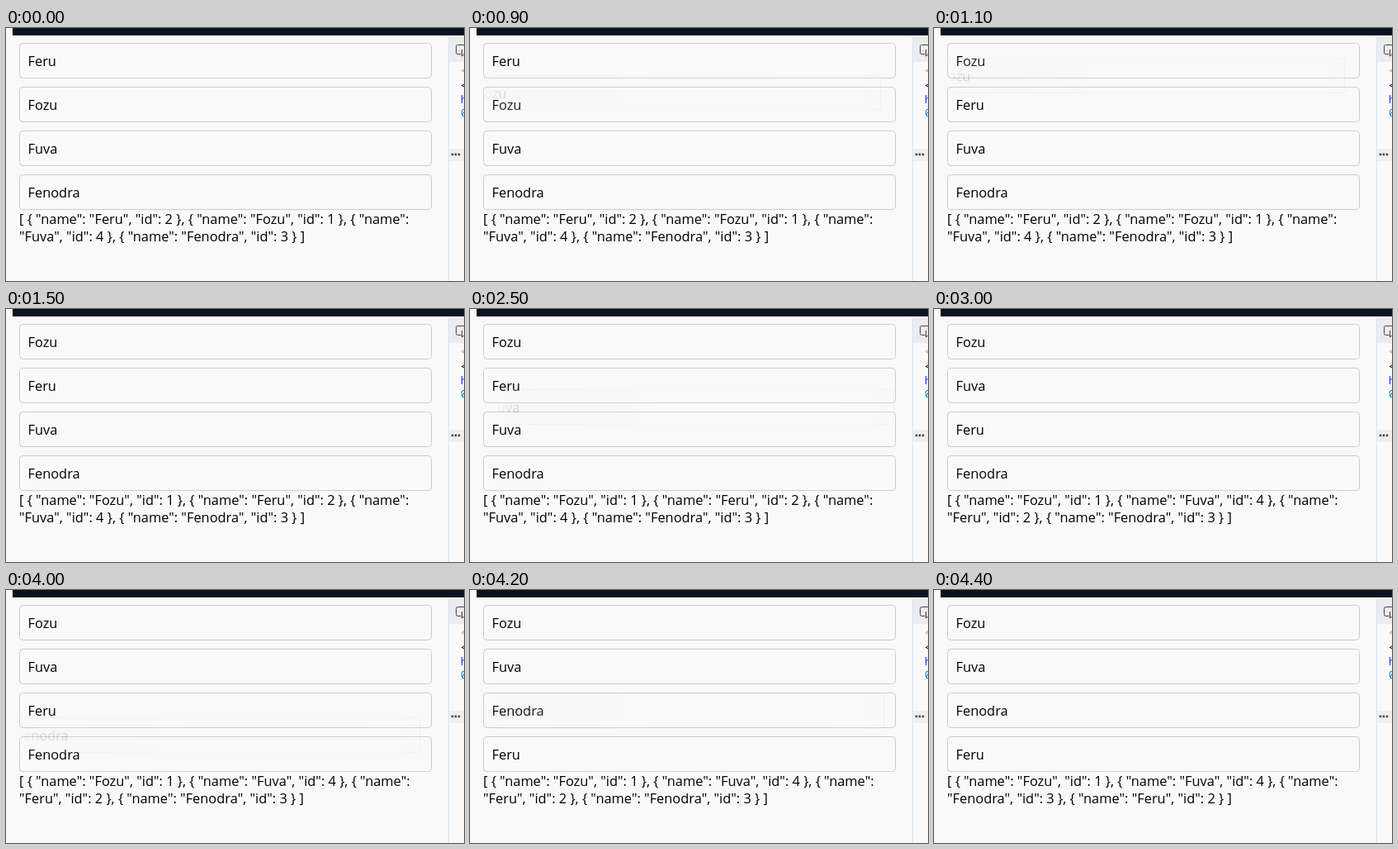
Write an HTML page that moves like this. It is 555 px wide and 306 px high and loops after 5.5 s.

```html
<!DOCTYPE html>
<html lang="en">
<head>
<meta charset="utf-8">
<title>Sortable list</title>
<style>
  html, body { margin: 0; width: 100%; height: 100%; overflow: hidden; background: #f9f9f9; }
  svg { display: block; width: 555px; height: 306px; }
  text { font-family: "Open Sans", "Noto Sans", sans-serif; font-size: 16.4px; fill: #000; white-space: pre; }
  .box { fill: #f9f9f9; stroke: #ccc; }
  .code text { font: 12px "Noto Sans Mono", monospace; }
</style>
</head>
<body>
<svg viewBox="0 0 555 306">
  <defs>
    <linearGradient id="fade">
      <stop offset=".03" stop-color="#fff" stop-opacity="0"/>
      <stop offset=".08" stop-color="#fff" stop-opacity=".14"/>
      <stop offset=".5" stop-color="#fff" stop-opacity=".06"/>
      <stop offset=".96" stop-color="#fff" stop-opacity=".08"/>
      <stop offset="1" stop-color="#fff" stop-opacity=".2"/>
    </linearGradient>
    <mask id="soft" maskUnits="userSpaceOnUse" x="0" y="0" width="555" height="60">
      <rect x="16" width="500" height="60" fill="url(#fade)"/>
    </mask>
  </defs>

  <rect x="8" width="547" height="9" fill="#0b1220"/>

  <!-- side panel -->
  <rect x="537" y="10" width="18" height="296" fill="#fafafa"/>
  <rect x="537" y="10" width="18" height="31" fill="#ececee"/>
  <rect x="536" y="10" width="1" height="296" fill="#d3e3fd"/>
  <path d="M555 20.5h-7.5q-2 0-2 2v7q0 2 2 2h4M552.5 26v8l2.5-2" fill="none" stroke="#444"/>
  <rect x="537" y="146" width="18" height="15" fill="#efefef"/>
  <g fill="#444"><circle cx="541" cy="153" r="1.4"/><circle cx="545" cy="153" r="1.4"/><circle cx="549" cy="153" r="1.4"/></g>
  <g class="code">
    <text x="551" y="56" style="fill:#999">&lt;</text>
    <text x="551" y="74">&lt;</text>
    <text x="551" y="91" style="fill:#2a2ad0">h</text>
    <text x="551" y="107" style="fill:#0b7fc4">0</text>
  </g>

  <g id="list"></g>
  <text id="line1" x="16" y="237"></text>
  <text id="line2" x="16" y="258"></text>
  <g id="ghost" mask="url(#soft)"></g>
</svg>
<script>
const LOOP = 5500, STEP = 100, TOP = 18, PITCH = 53;
const ids = { Feru: 2, Fozu: 1, Fuva: 4, Fenodra: 3 };

// Each drag lifts the item at index `from` one place up; `lift` holds one offset per step.
const drags = [
  { start: 900, swap: 1000, drop: 1500, from: 1, dx: -18, lift: [-14, -25, -35, -40, -40, -41] },
  { start: 2500, swap: 2600, drop: 3000, from: 2, dx: -2, lift: [-27, -43, -52] },
  { start: 4000, swap: 4100, drop: 4400, from: 3, dx: -14, lift: [-23, -42, -52] }
];

const $ = id => document.getElementById(id);

const row = (name, y) =>
  `<g transform="translate(0 ${y})"><rect class="box" x="16.5" y=".5" width="499" height="42" rx="4"/>` +
  `<text x="26.5" y="28">${name}</text></g>`;

function orderAt(t, event) {
  const names = Object.keys(ids);
  for (const d of drags) {
    if (t >= d[event]) names.splice(d.from - 1, 0, names.splice(d.from, 1)[0]);
  }
  return names;
}

function jsonLines(names) {
  const items = names.map(n => `{ "name": "${n}", "id": ${ids[n]} }`);
  const text = `[ ${items.join(", ")} ]`;
  const cut = text.indexOf(`"${names[2]}"`);
  return [text.slice(0, cut - 1), text.slice(cut)];
}

function draw(t) {
  $("list").innerHTML = orderAt(t, "swap").map((n, i) => row(n, TOP + i * PITCH)).join("");
  [$("line1").textContent, $("line2").textContent] = jsonLines(orderAt(t, "drop"));

  const d = drags.find(d => t >= d.start && t < d.drop);
  $("ghost").innerHTML = "";
  if (!d) return;
  const k = Math.min(Math.floor((t - d.start) / STEP), d.lift.length - 1);
  const y = TOP + d.from * PITCH + d.lift[k];
  $("ghost").innerHTML = row(orderAt(d.start, "drop")[d.from], 0);
  $("ghost").setAttribute("transform", `translate(${d.dx} ${y})`);
}

const begin = performance.now();
let last = -1;
function tick() {
  const t = Math.floor(((performance.now() - begin) % LOOP) / STEP) * STEP;
  if (t !== last) draw(last = t);
  requestAnimationFrame(tick);
}
tick();
</script>
</body>
</html>
```
